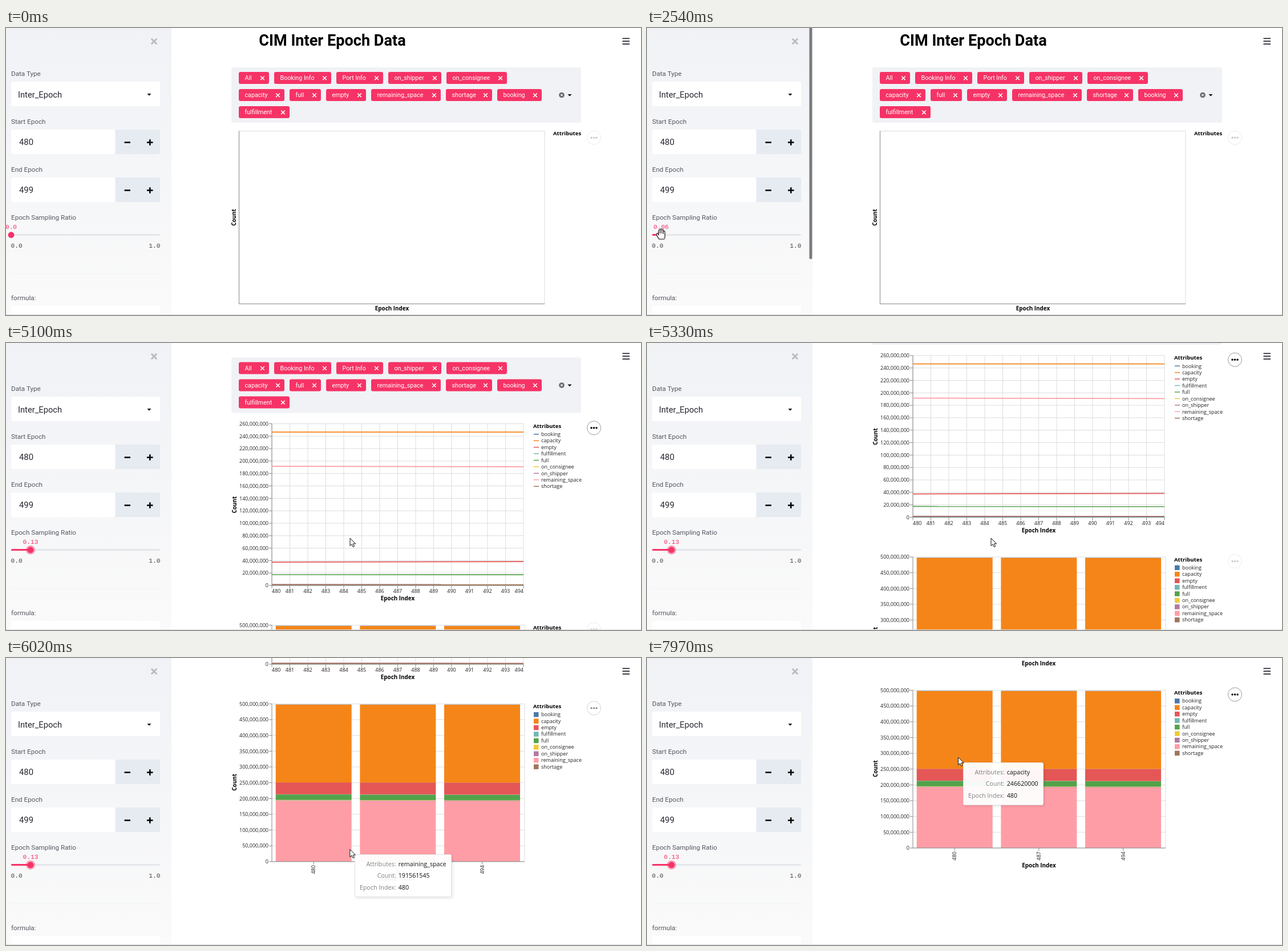
Write an HTML page that moves like this. It is 1113x503 px and loops after 8000 ms.

```html
<!DOCTYPE html>
<html lang="en">
<head>
<meta charset="utf-8">
<title>CIM Inter Epoch Data</title>
<style>
  html, body { margin: 0; width: 100%; height: 100%; overflow: hidden; background: #fff; }
  svg { position: absolute; left: 0; top: 0; width: 1113px; height: 503px; }
  text { font-family: Roboto, sans-serif; white-space: pre; }
  .chart { font-family: "Open Sans", sans-serif; }
  .mono { font-family: "Liberation Mono", monospace; }
  #tip {
    position: absolute; left: 0; top: 0; box-sizing: border-box; height: 75px;
    display: grid; grid-template-columns: auto auto; column-gap: 4px;
    padding: 6px 8px; border: 1px solid #e3e3e3; border-radius: 3px;
    background: rgba(255, 255, 255, .95); box-shadow: 2px 2px 4px rgba(0, 0, 0, .1);
    font: 10.7px/20.4px "Open Sans", sans-serif; color: #111; white-space: nowrap;
  }
  #tip b { font-weight: 400; color: #808080; text-align: right; }
</style>
</head>
<body>
<svg id="page" viewBox="0 0 1113 503"></svg>
<div id="tip"></div>
<svg id="pointer" viewBox="0 0 1113 503"></svg>
<script>
const LOOP = 8000, PINK = '#f63366', INK = '#262730';
const $ = id => document.getElementById(id);

// Markup helpers
const rect = (x, y, w, h, fill, r = 0, more = '') =>
  `<rect x="${x}" y="${y}" width="${w}" height="${h}" fill="${fill}" rx="${r}" ${more}/>`;
const path = (d, stroke, width = 1, fill = 'none', more = '') =>
  `<path d="${d}" stroke="${stroke}" stroke-width="${width}" fill="${fill}" ${more}/>`;
const text = (x, y, s, size, fill = INK, more = '') =>
  `<text x="${x}" y="${y + size * .36}" font-size="${size}" fill="${fill}" ${more}>${s}</text>`;
const label = (x, y, s, anchor = 'start') =>
  text(x, y, s, 9.05, '#222', `class="chart" text-anchor="${anchor}"`);
const heading = (x, y, s, anchor = 'middle', size = 9.9) =>
  text(x, y, s, size, '#000', `class="chart" font-weight="700" text-anchor="${anchor}"`);
const turned = (x, y, s) => `<g transform="translate(${x} ${y}) rotate(-90)">${s}</g>`;
const cross = (x, y, r, color, width) =>
  path(`M${x - r},${y - r}l${2 * r},${2 * r}m0,${-2 * r}l${-2 * r},${2 * r}`, color, width);
const caret = (x, y) => path(`M${x - 3.5},${y - 1.5}h7l-3.5,3.7z`, 'none', 0, '#111');
const range = n => [...Array(n).keys()];

// name, colour, value at the first and last epoch (millions)
const series = [
  ['booking', '#4c78a8', .7, .7],
  ['capacity', '#f58518', 246.62, 246.62],
  ['empty', '#e45756', 37.53, 38.4],
  ['fulfillment', '#72b7b2', .5, .5],
  ['full', '#54a24b', 17.42, 17.3],
  ['on_consignee', '#eeca3b', 1.3, 1.2],
  ['on_shipper', '#b279a2', 1.7, 1.4],
  ['remaining_space', '#ff9da6', 191.561545, 190.9],
  ['shortage', '#9d755d', .9, .9]
];

function dots(id, y) {
  return `<g id="${id}"><circle cx="1030.5" cy="${y}" r="12" fill="#fff" stroke="#999"/>` +
    [-4.5, 0, 4.5].map(d => `<circle cx="${1030.5 + d}" cy="${y}" r="1.7"/>`).join('') + '</g>';
}

function legend(y, square) {
  return heading(924, y, 'Attributes', 'start', 9.6) + series.map(([name, color], i) => {
    const cy = y + 14.3 + i * 11.43;
    return (square ? rect(925, cy - 4, 8.5, 8.5, color) : path(`M925,${cy}h9`, color, 1.5)) +
      label(938, cy, name);
  }).join('');
}

function yAxis(top, bottom, right, max, step) {
  return range(max / step + 1).map(i => {
    const y = bottom - (bottom - top) * i * step / max;
    return path(`M466,${y}H${right}`, '#ddd') + path(`M461,${y}h5`, '#888') +
      label(460, y, (i * step * 1e6).toLocaleString('en-US'), 'end');
  }).join('');
}

function emptyChart() {
  return rect(408.5, 180.5, 535.5, 303, '#fff', 0, 'stroke="#ddd"') +
    path('M408.5,180.5V483.5H944', '#888') +
    turned(399.5, 332, heading(0, 0, 'Count')) +
    heading(676.5, 491, 'Epoch Index') + heading(959, 184.5, 'Attributes', 'start', 9.6);
}

function lineChart(last) {
  const top = 185, bottom = 468.5, n = last - 480, y = v => bottom - v / 260 * (bottom - top);
  const ticks = range(n + 1).map(i => {
    const x = 466 + 441 * i / n;
    const anchor = i == 0 ? 'start' : i == n ? 'end' : 'middle';
    return path(`M${x},${top}V${bottom}`, '#ddd') + path(`M${x},${bottom}v5`, '#888') +
      label(x, 478.5, 480 + i, anchor);
  }).join('');
  return ticks + yAxis(top, bottom, 907, 260, 20) + path(`M466,${top}V${bottom}H907`, '#888') +
    series.map(([, color, a, b]) => path(`M466,${y(a)}L907,${y(b)}`, color, 1.7)).join('') +
    turned(400, 327, heading(0, 0, 'Count')) + heading(686.5, 491.3, 'Epoch Index') + legend(189, false);
}

const BAR_TOP = 538, BAR_BOTTOM = 814.5, MILLION = (BAR_BOTTOM - BAR_TOP) / 500;

function barChart() {
  const bars = range(3).map(i => {
    const x = 472.7 + i * 147.67;
    let y = BAR_BOTTOM;
    return [...series].reverse().map(([, color, a, b]) => {
      const h = (a + (b - a) * i / 2) * MILLION;
      return rect(x, y -= h, 133, h, color);
    }).join('') + path(`M${x + 66.5},${BAR_BOTTOM}v5`, '#888') +
      turned(x + 66.5, 828.5, label(0, 0, 480 + 7 * i, 'middle'));
  }).join('');
  return yAxis(BAR_TOP, BAR_BOTTOM, 909, 500, 50) + path(`M909,${BAR_TOP}V${BAR_BOTTOM}`, '#ddd') +
    bars + path(`M466,${BAR_TOP}V${BAR_BOTTOM}H909`, '#888') +
    turned(400, 675.5, heading(0, 0, 'Count')) + heading(687, 844.5, 'Epoch Index') +
    legend(542.3, true) + dots('barDots', 545.5);
}

function tags() {
  const rows = [
    [['All', 53], ['Booking Info', 100], ['Port Info', 82], ['on_shipper', 93], ['on_consignee', 106]],
    [['capacity', 80], ['full', 55], ['empty', 70], ['remaining_space', 122], ['shortage', 81], ['booking', 78]],
    [['fulfillment', 89]]
  ];
  return rect(395, 69, 613, 97, '#f0f2f6', 3) + rows.map((row, r) => {
    let x = 408;
    const y = 77 + 30 * r;
    return row.map(([name, w]) => {
      const tag = rect(x, y, w, 21, PINK, 3) + text(x + 10.5, y + 10.3, name, 10.7, '#fff') +
        cross(x + w - 11.5, y + 10.8, 3.3, '#fff', 1.5);
      x += w + 9;
      return tag;
    }).join('');
  }).join('') + '<circle cx="974" cy="117.5" r="4.8" fill="#6b6c70"/>' +
    cross(974, 117.5, 1.6, '#fff', 1.2) + caret(988, 117.5);
}

function numberBox(y, name, value) {
  return text(9, y - 14, name, 11.7, '#555761') + rect(9, y, 261, 43, '#e6eaf1', 3) +
    rect(9, y, 182.5, 43, '#fff', 3) + text(23, y + 22, value, 14.8) +
    path(`M207.5,${y + 22.5}h10.5M247,${y + 22.5}h10.5m-5.2,-5.2v10.4`, '#000', 2.5);
}

function sidebar() {
  return '<linearGradient id="shade" x2="0" y2="1"><stop stop-color="#f0f2f6"/>' +
    '<stop offset="1" stop-color="#fafafa"/></linearGradient>' +
    rect(0, 0, 290, 503, 'url(#shade)') + cross(259.5, 23.5, 4.7, '#bbbcc0', 3) +
    text(9, 80, 'Data Type', 11.7, '#555761') + rect(9, 94, 261, 43, '#fff', 3) +
    text(21, 116.5, 'Inter_Epoch', 14.7) + caret(251, 116.5) +
    numberBox(178, 'Start Epoch', 480) + numberBox(262, 'End Epoch', 499) +
    text(9, 332, 'Epoch Sampling Ratio', 11.7, '#555761') +
    rect(9, 361, 261, 3, '#e4e6ea', 1.5) + rect(9, 361, 0, 3, PINK, 1.5, 'id="fill"') +
    '<circle id="halo" cy="362.7" r="8" fill="#f63366" opacity=".45"/>' +
    `<circle id="thumb" cy="362.7" r="5.4" fill="${PINK}"/>` +
    text(0, 347.5, '', 11.2, PINK, 'id="ratio" class="mono" text-anchor="middle"') +
    text(8.5, 381, '0.0', 11.2, '#444', 'class="mono"') +
    text(270.5, 381, '1.0', 11.2, '#444', 'class="mono" text-anchor="end"') +
    path('M9,430.5H270', '#f1f2f5') + text(9, 473, 'formula:', 11.7, '#555761') +
    rect(9, 487, 261, 20, '#fff', 3) + rect(284.5, -4, 5, 409, '#7b7b7d', 2, 'id="bar"');
}

$('page').innerHTML =
  `<g id="main">${text(572, 21.5, 'CIM Inter Epoch Data', 27.1, '#000', 'font-weight="700" text-anchor="middle"')}` +
  tags() + `<g id="blank">${emptyChart()}</g><g id="wide">${lineChart(496)}</g>` +
  `<g id="lines">${lineChart(494)}</g>${dots('lineDots', 192.3)}<g id="bars">${barChart()}</g></g>` +
  sidebar() + path('M1080.5,18.3h12.5m-12.5,4.9h12.5m-12.5,4.9h12.5', INK, 1.8) +
  path('M0,502.5H1113', '#dcdcdc');

$('pointer').innerHTML =
  path('M0,0V13.5L3.2,10.6L5.3,15.4L7.6,14.4L5.5,9.8H9.7Z', '#111', 1, '#fff', 'id="arrow"') +
  path('M-3.5,-7q2.5,0 3.5,1q1,-1 3.5,-1M0,-6V6M-3.5,7q2.5,0 3.5,-1q1,1 3.5,1', '#111', 1, 'none', 'id="beam"') +
  path('M-4,9L-8,2Q-9,-1 -6.5,-1L-4.5,1.5V-6q0,-1.5 1.3,-1.5t1.4,1.5V-1V-7.5q0,-1.5 1.3,-1.5t1.4,1.5' +
    'V-1V-6.5q0,-1.5 1.3,-1.5t1.4,1.5V0V-4q0,-1.4 1.3,-1.4t1.4,1.4V2.5Q7,6 5,9Z', '#111', 1.1, '#fff', 'id="hand"');

// Each key is [time, ...values]
const cursorKeys = [
  [150, 560, 500], [400, 480, 380], [650, 270, 260], [930, 62, 197], [1230, 62, 197],
  [1500, 45, 290], [1930, 9, 361], [2160, 9, 361], [2390, 25, 361], [3390, 25, 361],
  [3550, 43, 362], [3700, 43, 362], [4400, 603, 342], [5790, 603, 342], [6020, 603, 335.5],
  [6250, 570, 300], [6480, 538, 281], [6880, 538, 281], [7030, 547.5, 246.5], [7340, 547, 213],
  [7510, 547, 213], [7740, 543, 160], [7970, 545.5, 174]
];
const scrollKeys = [
  [5099, 0], [5100, 43], [5250, 120], [5410, 205], [5560, 241], [5789, 241],
  [5790, 275], [5870, 360], [6020, 457.5], [6180, 481.5]
];
const ratioKeys = [[2160, 0], [2390, .06], [3390, .06], [3550, .13]];
const lineDotKeys = [[150, .2], [300, 1], [500, 1], [650, .2], [4000, .2], [4200, 1]];
const barDotKeys = [[5900, .2], [6020, .45], [6150, 1]];

function track(keys, t) {
  const i = keys.findIndex(k => k[0] > t);
  if (i == 0) return keys[0].slice(1);
  if (i < 0) return keys.at(-1).slice(1);
  const a = keys[i - 1], b = keys[i], p = (t - a[0]) / (b[0] - a[0]);
  return a.slice(1).map((v, j) => v + (b[j + 1] - v) * p);
}

const show = (id, on) => { $(id).style.display = on ? '' : 'none'; };

function hovered(pageY) {
  let sum = (BAR_BOTTOM - pageY) / MILLION;
  return [...series].reverse().find(s => (sum -= s[2]) < 0) || series[0];
}

function draw(now) {
  const t = now % LOOP;
  const [x, y] = track(cursorKeys, t), [scroll] = track(scrollKeys, t);
  const ratio = +track(ratioKeys, t)[0].toFixed(2), thumbX = 9 + 261 * ratio;

  $('main').setAttribute('transform', `translate(0 ${-scroll})`);
  show('blank', t < 2860);
  show('wide', t >= 2860 && t < 3780);
  show('lines', t >= 3780);
  show('bars', t >= 2860);
  $('lineDots').setAttribute('opacity', track(lineDotKeys, t)[0]);
  $('barDots').setAttribute('opacity', track(barDotKeys, t)[0]);

  $('fill').setAttribute('width', thumbX - 9);
  for (const id of ['halo', 'thumb']) $(id).setAttribute('cx', thumbX);
  show('halo', t >= 2160);
  $('ratio').setAttribute('x', thumbX);
  $('ratio').textContent = ratio ? ratio : '0.0';
  show('bar', t >= 150 && x < 290);

  const hand = t >= 1930 && t < 3700;
  const beam = !hand && x > 9 && x < 191 && ((y > 178 && y < 221) || (y > 262 && y < 305));
  $('pointer').style.display = t < 150 ? 'none' : '';
  show('hand', hand);
  show('beam', beam);
  show('arrow', !hand && !beam);
  for (const id of ['hand', 'beam', 'arrow']) $(id).setAttribute('transform', `translate(${x} ${y})`);

  const tipOn = t >= 5940;
  show('tip', tipOn);
  if (tipOn) {
    const [name, , value] = hovered(y + scroll);
    $('tip').innerHTML = `<b>Attributes:</b><span>${name}</span><b>Count:</b>` +
      `<span>${Math.round(value * 1e6)}</span><b>Epoch Index:</b><span>480</span>`;
    $('tip').style.transform = `translate(${Math.round(x + 8)}px, ${Math.round(y + 8.5)}px)`;
  }
  requestAnimationFrame(() => draw(performance.now()));
}
draw(0);
</script>
</body>
</html>
```
